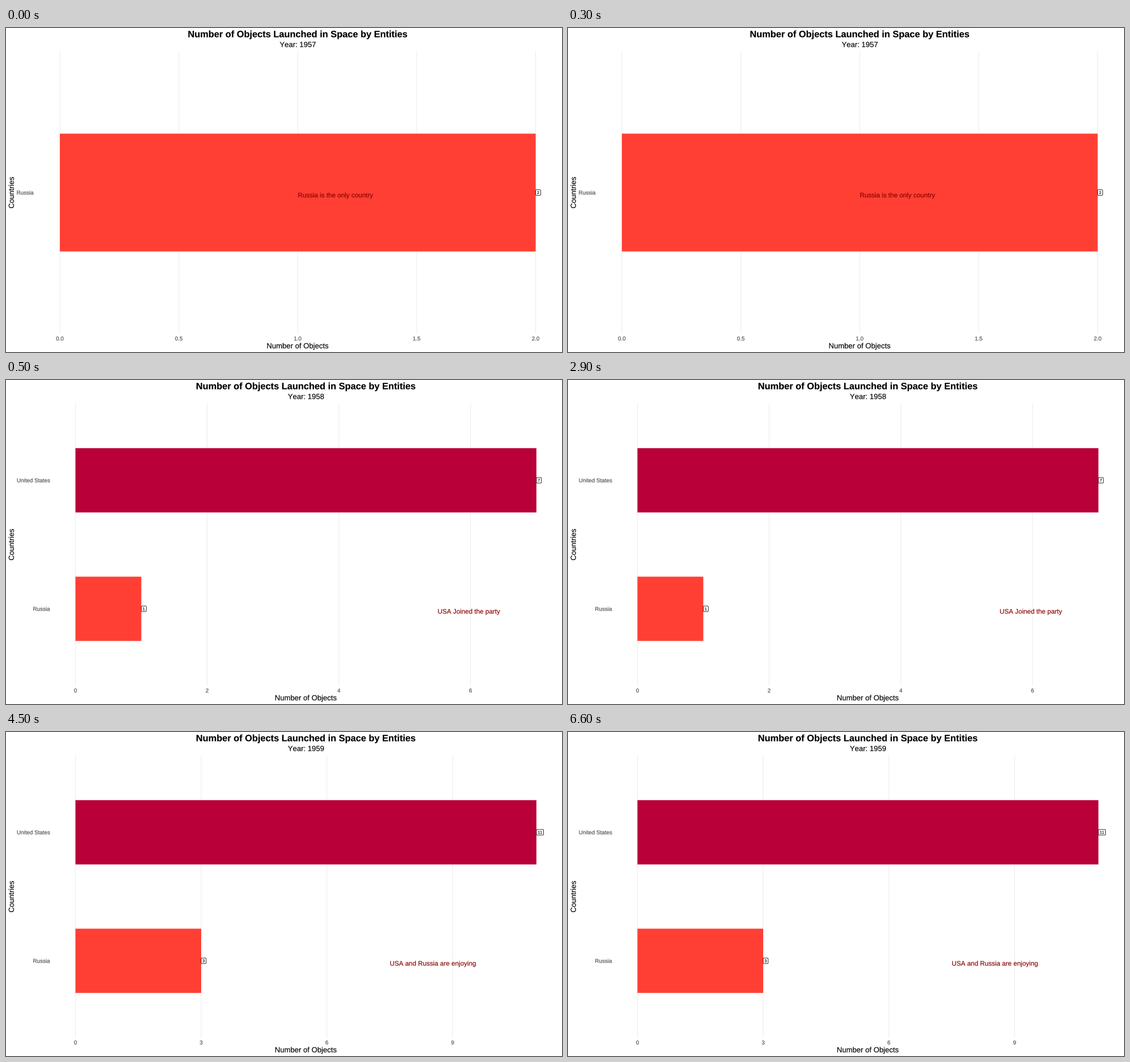
A matplotlib script that plays this animation: 980 by 572 pixels, repeating every 8 s.

```python
import matplotlib.pyplot as plt
from matplotlib.animation import FuncAnimation
from matplotlib.patches import FancyBboxPatch, PathPatch, Rectangle
from matplotlib.textpath import TextPath
from matplotlib.transforms import Affine2D

plt.rcParams["text.kerning_factor"] = 6  # even digit spacing

W, H, DPI = 980, 572, 100
PX = 72 / DPI
STEP = 500
TOP, BOTTOM, RIGHT = 40.9, 540.1, 975.5
BIG, MEDIUM, SMALL, NOTE_SIZE, TINY = 16.36, 13.1, 9.82, 11.65, 7.0
RED, CRIMSON = "#ff3f34", "#b90038"
INK, GREY, NOTE, GRID = "#000000", "#4d4d4d", "#8b0000", "#ebebeb"

# Bars run from the bottom up: name, value, colour.
SCENES = [
    dict(start=0, year=1957, left=53.0, name_x=48.6,
         ticks=[0, 0.5, 1, 1.5, 2], fmt="{:.1f}",
         bars=[("Russia", 2, RED)],
         note=(1, "Russia is the only country")),
    dict(start=500, year=1958, left=81.8, name_x=77.5,
         ticks=[0, 2, 4, 6], fmt="{:.0f}",
         bars=[("Russia", 1, RED), ("United States", 7, CRIMSON)],
         note=(5.5, "USA Joined the party")),
    dict(start=4500, year=1959, left=81.8, name_x=77.5,
         ticks=[0, 3, 6, 9], fmt="{:.0f}",
         bars=[("Russia", 3, RED), ("United States", 11, CRIMSON)],
         note=(7.5, "USA and Russia are enjoying")),
]

fig = plt.figure(figsize=(W / DPI, H / DPI), dpi=DPI, facecolor="white")
ax = fig.add_axes([0, 0, 1, 1])


def text(x, y, s, size, color=INK, align=0.5, weight="normal", angle=0, z=3):
    """Outlined text on baseline y; align 0, 0.5 or 1 places x along it."""
    path = TextPath((0, 0), s, size=size,
                    prop=dict(family="Liberation Sans", weight=weight))
    box = path.get_extents()
    shift = -(box.x0 + align * box.width) if align else 0
    place = (Affine2D().translate(shift, 0).scale(1, -1)
             .rotate_deg(-angle).translate(x, y))
    ax.add_patch(PathPatch(place.transform_path(path), fc=color, ec=color,
                           lw=0.15 * PX, snap=False, zorder=z))


def value_label(x, y, value):
    s = str(value)
    w, h = 4.9 + 0.556 * TINY * len(s), 9.9
    ax.add_patch(FancyBboxPatch(
        (x, y - h / 2), w, h, boxstyle="round,pad=0,rounding_size=1.5",
        fc="white", ec=INK, lw=0.8 * PX, snap=False, zorder=4))
    text(x + w / 2, y + 0.36 * TINY, s, TINY, z=5)


def draw_scene(sc):
    left = sc["left"]
    peak = max(value for _, value, _ in sc["bars"])
    unit = (RIGHT - left) / 1.1 / peak
    x0 = left + 0.05 * peak * unit

    for t in sc["ticks"]:
        x = x0 + t * unit
        ax.plot([x, x], [TOP, BOTTOM], color=GRID, lw=0.95 * PX, snap=False,
                solid_capstyle="butt", zorder=1)
        text(x, 551.6, sc["fmt"].format(t), SMALL, GREY)

    band = (BOTTOM - TOP) / (len(sc["bars"]) + 0.2)
    low = BOTTOM - 0.6 * band
    for i, (name, value, color) in enumerate(sc["bars"]):
        y = low - i * band
        ax.add_patch(Rectangle((x0, y - band / 4), value * unit, band / 2,
                               fc=color, lw=0, snap=False, zorder=2))
        text(sc["name_x"], y + 0.36 * SMALL, name, SMALL, GREY, align=1)
        value_label(x0 + value * unit, y, value)

    x, note = sc["note"]
    text(x0 + x * unit, low + 8.5, note, NOTE_SIZE, NOTE, align=0, z=6)

    mid = (left + RIGHT) / 2
    text(mid, 16.3, "Number of Objects Launched in Space by Entities", BIG,
         weight="bold")
    text(mid, 33.6, f"Year: {sc['year']}", MEDIUM)
    text(mid, 565.5, "Number of Objects", MEDIUM)
    text(13.9, (TOP + BOTTOM) / 2, "Countries", MEDIUM, angle=90)


def update(frame):
    ax.clear()
    ax.set(xlim=(0, W), ylim=(H, 0))
    ax.axis("off")
    now = frame * STEP
    draw_scene([sc for sc in SCENES if sc["start"] <= now][-1])
    return []


anim = FuncAnimation(fig, update, frames=16, interval=STEP,
                     init_func=lambda: update(0), repeat=True, repeat_delay=0)
plt.show()
```
